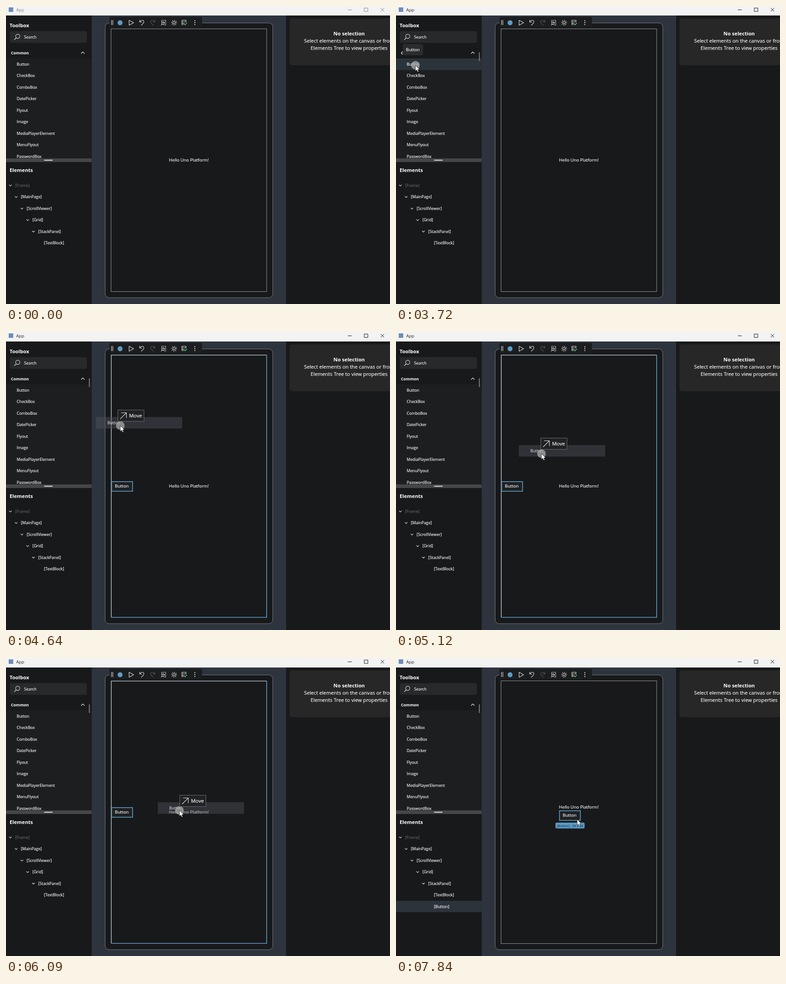
An HTML page for the animation above (8000 ms loop, 850 by 659 pixels).

```html
<!DOCTYPE html>
<html lang="en">
<head>
<meta charset="utf-8">
<title>App designer</title>
<style>
  html, body { margin: 0; width: 100%; height: 100%; overflow: hidden; background: #18191b; }
  svg { display: block; width: 100vw; height: 100vh; }
  text { font-family: "Open Sans", "Noto Sans", sans-serif; font-size: 8.8px; fill: #fff; stroke: #fff; stroke-width: .15px; white-space: pre; }
  .m { font-size: 9.6px; }
  .l { font-size: 11.2px; }
  .b { font-weight: 700; stroke: none; }
  .dim { fill: #717274; stroke: none; }
  .line { fill: none; stroke: #e4e4e4; stroke-width: 1.1; stroke-linecap: round; stroke-linejoin: round; }
</style>
</head>
<body>
<svg viewBox="0 0 850 659" preserveAspectRatio="none">
  <rect width="850" height="659" fill="#18191b"/>

  <!-- design surface -->
  <rect x="189.5" y="21" width="430.5" height="638" fill="#2e343d"/>
  <rect x="219.5" y="37.5" width="371" height="607.5" rx="9" fill="#18191b" stroke="#77797c"/>
  <rect id="page" x="232.5" y="50.5" width="344.5" height="581" fill="none" stroke="#97989a"/>
  <g id="pageHot" fill="none" stroke-width="1.6">
    <path d="M577 51V631H233" stroke="#5f9fc6"/>
    <path d="M577 51H233V631" stroke="#a9b9c4"/>
  </g>
  <path d="M229 48V28q0-4 4-4H430q4 0 4 4V48z" fill="#1c1d1f"/>
  <g class="line">
    <path d="M233.5 31V42M236.5 31V42" stroke-linecap="butt"/>
    <path d="M272.5 31.5V42.5L282.5 37z"/>
    <path d="M296 31V35.5H300.5M296.3 35.2Q299 31 302.5 31.5Q306 32.6 305 36.3Q304 38.5 299.5 42.5"/>
    <path d="M329.5 31V35.5H325M329.2 35.2Q326.500 31 323 31.500Q319.500 32.600 320.500 36.300Q321.500 38.500 326 42.500" stroke="#59595b"/>
    <path d="M344.500 35V31.500H353.500V42H350" stroke-dasharray="2 1.600"/>
    <circle cx="347.500" cy="38" r="2.600"/><path d="M345.600 40L343.500 42.500M349 35L351 37"/>
    <circle cx="372" cy="37" r="2.700"/>
    <circle cx="372" cy="37" r="5.400" stroke-dasharray=".6 3.640" stroke-width="1.500"/>
    <path d="M390 31.500H398.500V35H390q-2-1.700 0-3.500M398 35.500M389.500 35V41H393M390 38.500H394"/>
    <path d="M394.500 39.500L396.500 41.700L400 37.500" stroke="#48c774" stroke-width="1.500"/>
  </g>
  <circle cx="252.500" cy="37" r="5.500" fill="#5d9cc4"/>
  <g fill="#fff"><circle cx="418" cy="32.500" r="1.100"/><circle cx="418" cy="36.700" r="1.100"/><circle cx="418" cy="41" r="1.100"/></g>

  <text id="hello" class="m" x="360.700">Hello Uno Platform!</text>
  <g id="slot" fill="none" stroke="#5f9fc6">
    <path d="M361.500 337V323.500H449.500V337" stroke-width=".8"/>
    <path d="M361 336.500H449.500" stroke="#9fc3da" stroke-dasharray="3 2"/>
    <path d="M408 337.500H449.500V359.500H408" stroke="#8b9298"/>
  </g>
  <g id="newButton">
    <rect x=".8" y=".8" width="46.400" height="21.400" fill="#1f2123" stroke="#5f9fc6" stroke-width="1.600"/>
    <text class="m" x="8" y="14.300">Button</text>
  </g>
  <g id="badge">
    <rect x="353" y="364" width="64.500" height="13" rx="3" fill="#5b99c4"/>
    <text x="356.500" y="373.700" style="font-size:7.200px;fill:#142634;stroke:none">[Button] - 59 x 28</text>
  </g>

  <!-- toolbox and element tree -->
  <rect y="21" width="189.500" height="638" fill="#18191b"/>
  <text class="l b" x="8" y="47">Toolbox</text>
  <rect x="8.500" y="55.500" width="170.500" height="26" rx="3" fill="#28292a"/>
  <g class="line"><circle cx="26" cy="67" r="4.600"/><path d="M22.500 70.500L18.500 74.500M166.500 105L170 101.500L173.500 105"/></g>
  <text x="40" y="71.800">Search</text>
  <text class="b" x="11" y="106.500">Common</text>
  <rect y="116" width="189.500" height="221" fill="#1d1e20"/>
  <rect id="hover" y="116" width="189.500" height="25.500" fill="#2c343b"/>
  <g id="tools"></g>
  <path id="thumb" d="M184.500 102.500V121.500" stroke="#8d8e90" stroke-width="1.700"/>
  <rect y="337" width="189.500" height="8" fill="#444648"/>
  <path d="M84.500 341H103" stroke="#fff" stroke-width="1.600"/>
  <text class="l b" x="8" y="367.300">Elements</text>
  <rect id="picked" y="537" width="189.500" height="25" fill="#2c343b"/>
  <g id="tree"></g>
  <g id="tip">
    <rect x="15" y="84" width="45" height="25" rx="3.500" fill="#2b2c2d"/>
    <text class="m" x="22" y="99.700">Button</text>
  </g>

  <!-- properties -->
  <rect x="627.500" y="27.500" width="264" height="103.500" rx="6" fill="#272728"/>
  <g text-anchor="middle">
    <text class="l b" x="759.500" y="65">No selection</text>
    <text class="l" x="759.500" y="81">Select elements on the canvas or from</text>
    <text class="l" x="759.500" y="97">Elements Tree to view properties</text>
  </g>

  <!-- title bar -->
  <rect width="850" height="21" fill="#f3f3f3"/>
  <rect x="6" y="3" width="10" height="10" fill="#6c8db5"/>
  <g id="chrome">
    <text id="title" class="m" x="22.500" y="12" style="stroke:none">App</text>
    <path d="M756.500 8.500H765.500M793 4.500H801V12H793zM829.500 4.500L837 12M837 4.500L829.500 12" fill="none"/>
  </g>

  <!-- drag visuals and pointer -->
  <g id="ghost">
    <rect x="-48" y="-17" width="191" height="25.500" fill="#52555e" opacity=".42"/>
    <text x="-22.500" y="-1" opacity=".8">Button</text>
  </g>
  <circle id="press" r="9.500" fill="#a9a9aa" opacity=".75"/>
  <g id="move">
    <rect x=".5" y="-32.500" width="58" height="25" fill="#212224" stroke="#6b6c6e"/>
    <path class="line" d="M6 -13L19 -26M8.500 -26.500H19.500V-15.500" stroke-width="1.300"/>
    <text class="l" x="25.500" y="-16">Move</text>
  </g>
  <path id="pointer" d="M0 0V13L3 10.300L5 15L7.200 14L5.200 9.500H9.300z" fill="#fff" stroke="#111" stroke-width=".7"/>
</svg>
<script>
const $ = id => document.getElementById(id);
const LOOP = 8000, STEP = 25.45;

$('tools').innerHTML = ['Button', 'CheckBox', 'ComboBox', 'DatePicker', 'Flyout', 'Image',
  'MediaPlayerElement', 'MenuFlyout', 'PasswordBox']
  .map((name, i) => `<text x="23.700" y="${132 + i * STEP}">${name}</text>`).join('');

$('tree').innerHTML = ['Frame', 'MainPage', 'ScrollViewer', 'Grid', 'StackPanel', 'TextBlock', 'Button']
  .map((name, i) => {
    const depth = Math.min(i, 5), x = 12.75 * depth, y = 396.7 + i * STEP;
    const arrow = depth < 5 ? `<path class="line" d="M${x + 7.2} ${y - 1}l2.500 2.500l2.500 -2.500"/>` : '';
    return `<g>${arrow}<text class="${i ? '' : 'dim'}" x="${x + 20.3}" y="${y + 3.3}">[${name}]</text></g>`;
  }).join('');
const newNode = $('tree').lastChild;

// Pointer stops: time, x, y, ease-out power of the way there
const stops = [
  [1280, 809, 500, 1], [2070, 125, 165, 3],
  [2090, 125, 165, 1], [2790, 43, 131, 2],
  [3740, 43, 131, 1], [4290, 169, 179, 1.4],
  [4390, 169, 179, 1], [4640, 253, 207, 1], [5190, 327, 273, 1.3],
  [5210, 327, 273, 1], [5650, 366, 315, 1.2], [6010, 383, 335, 1.4],
  [6030, 383, 335, 1], [6720, 399, 353, 1], [6850, 400, 356, 1]
];

function pointerAt(t) {
  if (t >= 7350) return [401, 357];
  const i = stops.findIndex(s => s[0] > t);
  if (i < 0) return [400, 356];
  if (i === 0) return [809, 500];
  const [t0, x0, y0] = stops[i - 1], [t1, x1, y1, power] = stops[i];
  const k = 1 - (1 - (t - t0) / (t1 - t0)) ** power;
  return [Math.round(x0 + (x1 - x0) * k), Math.round(y0 + (y1 - y0) * k)];
}

const show = (el, on) => { el.style.display = on ? '' : 'none'; };
const place = (id, [x, y]) => $(id).setAttribute('transform', `translate(${x} ${y})`);

function render(t) {
  const within = (a, b) => t >= a && t < b;
  const drop = 7760, pos = pointerAt(t), lagged = pointerAt(t - 20);
  const onPage = within(4440, 6260), inStack = t >= 6260;

  place('pointer', pos);
  place('press', pos);
  place('ghost', lagged);
  place('move', lagged);
  show($('pointer'), t >= 1280);
  show($('press'), within(3550, drop));
  show($('ghost'), within(3760, drop));
  show($('move'), within(4400, drop));

  const active = t >= 3300;
  $('title').style.fill = active ? '#222' : '#858585';
  $('chrome').setAttribute('stroke', active ? '#111' : '#858585');
  show($('hover'), within(3370, 3760));
  show($('tip'), within(3600, 3780));
  show($('thumb'), pos[0] < 189 || t > 1740);

  show($('page'), !onPage);
  show($('pageHot'), onPage);
  show($('slot'), within(6260, drop));
  show($('newButton'), onPage || inStack);
  place('newButton', inStack ? [361, 337] : [233, 330]);
  $('hello').setAttribute('y', inStack ? 333 : 344.3);

  show(newNode, t >= 7800);
  show($('picked'), t >= 7800);
  show($('badge'), t >= 7840);
}

const start = performance.now();
(function tick() {
  render((performance.now() - start) % LOOP);
  requestAnimationFrame(tick);
})();
</script>
</body>
</html>
```
